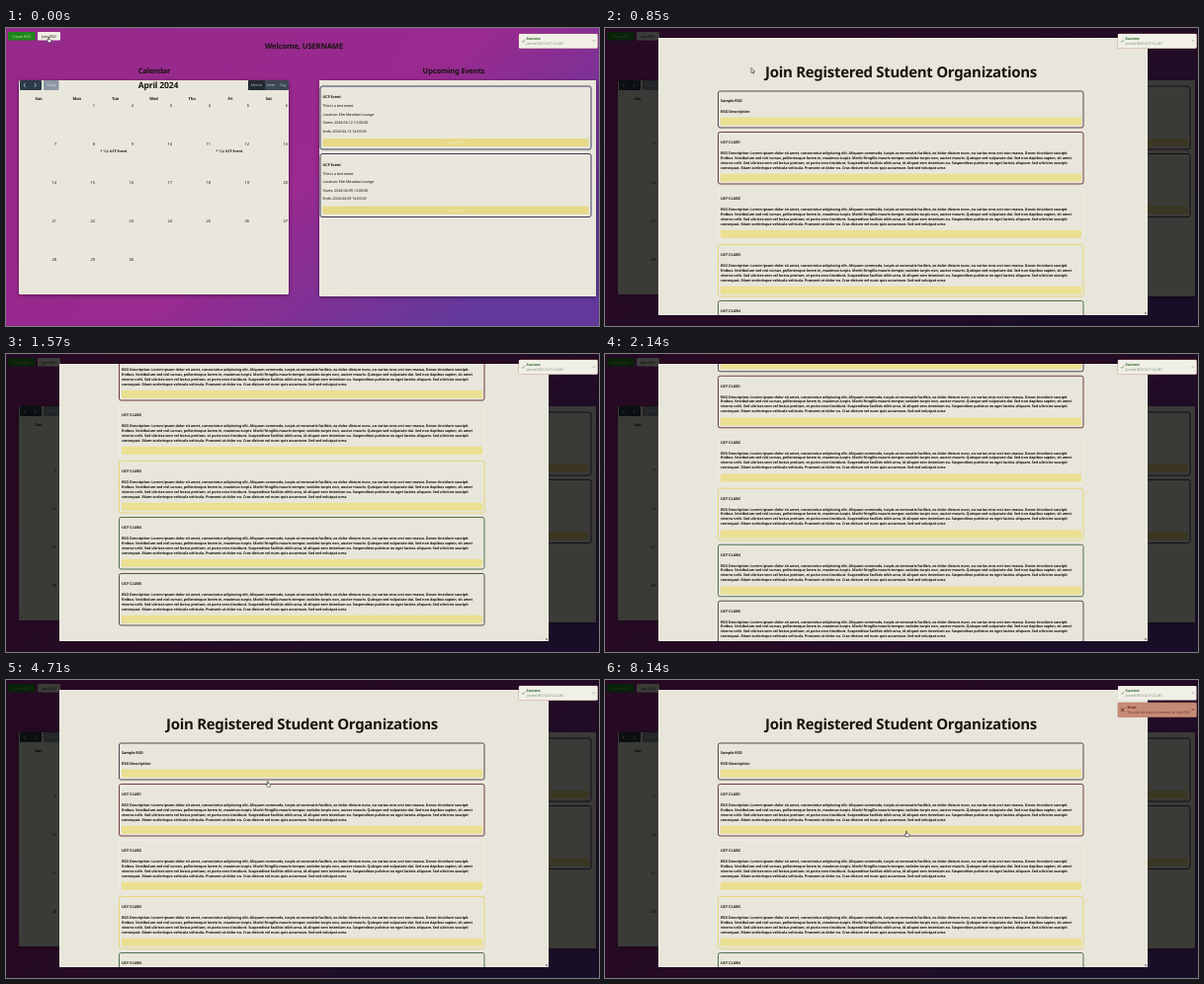
Recreate the animation shown at these times as an HTML page. Size 600x302 px, loop 8.28 s.

```html
<!DOCTYPE html>
<html lang="en">
<head>
<meta charset="utf-8">
<title>Join Registered Student Organizations</title>
<style>
html, body { margin: 0; height: 100%; overflow: hidden; background: #962a8c; }
#stage { display: block; width: 100vw; height: 100vh; }
text {
  font-family: "Noto Sans", "Open Sans", sans-serif;
  letter-spacing: -.02em;
  text-rendering: geometricPrecision;
  white-space: pre;
}
.panel { filter: drop-shadow(0 1px 2px #0006); }
</style>
</head>
<body>
<svg id="stage" viewBox="0 0 600 302">
  <defs>
    <linearGradient id="sky" x1="0" y1="0" x2="1" y2=".6">
      <stop offset="0" stop-color="#96298a"/>
      <stop offset=".6" stop-color="#992a90"/>
      <stop offset="1" stop-color="#62399b"/>
    </linearGradient>
  </defs>
  <g id="page"></g>
  <rect id="shade" width="600" height="302"/>
  <svg id="modal" x="54" y="10" width="495" height="281" viewBox="54 10 495 281">
    <rect x="54" y="10" width="495" height="281" rx="1" fill="#e8e6da" stroke="#f6f5ee"/>
    <g id="list"></g>
    <path d="M545.8 288.6h2.6l-1.3 1.6z" fill="#555"/>
  </svg>
  <g id="error"></g>
  <g id="success"></g>
  <g id="cursor" stroke="#222" stroke-width=".6" fill="#fff">
    <path id="arrow" d="M0 0v5l1.2-1 .9 1.9.8-.4-.9-1.8h1.6z"/>
    <path id="hand" d="M-.5 .4q.6-.8 1 0v2l2 .6q.6.3.4 1.2l-.5 1.6h-2.6l-1.6-2.2q.2-.8 1.3 0z"/>
  </g>
</svg>
<script>
const $ = id => document.getElementById(id);
const cream = '#e9e7db', yellow = '#ebdf92', ink = '#17150f';

const rect = (x, y, w, h, fill, more = '') =>
  `<rect x="${x}" y="${y}" width="${w}" height="${h}" fill="${fill}" ${more}/>`;
const label = (s, x, y, size, { bold, mid, end, fill = ink } = {}) =>
  `<text x="${x}" y="${y}" font-size="${size}" fill="${fill}" font-weight="${bold ? 700 : 400}"
    text-anchor="${mid ? 'middle' : end ? 'end' : 'start'}">${s}</text>`;
const cross = (x, y, r, color) =>
  `<path d="M${x - r} ${y - r}l${2 * r} ${2 * r}m0 ${-2 * r}l${-2 * r} ${2 * r}" stroke="${color}" stroke-width=".9"/>`;
const head = { bold: 1, mid: 1 };

function calendar() {
  let s = rect(13, 53, 273, 217, cream, 'rx="1.5" class="panel"')
    + rect(14, 53, 22, 10, '#2c3a47', 'rx="1"')
    + '<path d="M19.8 56l-1.8 2 1.8 2M28.7 56l1.8 2-1.8 2" fill="none" stroke="#ddd" stroke-width=".7"/>'
    + rect(38, 53, 15.5, 10, '#8a979f', 'rx="1"')
    + label('Today', 45.7, 59.4, 3.6, { mid: 1, fill: '#dde' })
    + rect(245, 53, 41, 10, '#3a4652', 'rx="1"') + rect(245, 53, 17, 10, '#212930', 'rx="1"')
    + label('April 2024', 154, 61, 8.6, head);
  ['Month', 'Week', 'Day'].forEach((v, i) =>
    s += label(v, [253.5, 268, 280.5][i], 59.4, 3.6, { mid: 1, fill: '#b9bec2' }));
  ['Sun', 'Mon', 'Tue', 'Wed', 'Thu', 'Fri', 'Sat'].forEach((d, i) =>
    s += label(d, 33 + 38.8 * i, 73.2, 4, head));
  for (let d = 1; d <= 30; d++)
    s += label(d, 51 + 39 * (d % 7), 80 + 39.1 * (d / 7 | 0), 4, { end: 1 });
  for (const x of [95.5, 212.5])
    s += `<circle cx="${x + .9}" cy="124.2" r=".8" fill="#345"/>`
      + label('12p <tspan font-weight="700">UCF Event</tspan>', x + 2.4, 125.6, 3.6);
  return s;
}

function eventCard(y, date) {
  const lines = ['This is a test event', 'Location: Elm Meadow Lounge',
    `Starts: ${date} 12:00:00`, `Ends: ${date} 14:00:00`];
  return rect(318, y, 274, 64, cream, 'rx="2" stroke="#3f3a5c"')
    + label('UCF Event', 320.5, y + 12, 3.8, { bold: 1 })
    + lines.map((l, i) => label(l, 320.5, y + 21.3 + 8.4 * i, 3.75)).join('')
    + rect(320.5, y + 53, 269, 8, '#e6d988', 'rx="1"')
    + label('Leave Event', 455, y + 58.3, 3.5, { mid: 1, fill: '#f6efc8' });
}

$('page').innerHTML = rect(0, 0, 600, 302, 'url(#sky)')
  + rect(2, 4, 27.5, 8.5, '#1d861b', 'rx="1"')
  + label('Create RSO', 15.7, 9.6, 3.7, { mid: 1, fill: '#b9dfa8' })
  + rect(32, 4, 23, 8.5, '#f0eee6', 'rx="1"') + label('Join RSO', 43.5, 9.6, 3.8, { mid: 1 })
  + label('Welcome, USERNAME', 301.5, 20.6, 7.7, head)
  + label('Calendar', 150, 46, 7.5, head) + label('Upcoming Events', 453, 46, 7.5, head)
  + calendar()
  + rect(317, 53, 280, 219, cream, 'class="panel"')
  + eventCard(59, '2024-04-12') + eventCard(127.5, '2024-04-09');

const lorem = [
  'RSO Description: Lorem ipsum dolor sit amet, consectetur adipiscing elit. Aliquam commodo, turpis at venenatis facilisis, ex dolor dictum nunc, eu varius eros orci non massa. Donec tincidunt suscipit',
  'finibus. Vestibulum sed nisl cursus, pellentesque lorem in, maximus turpis. Morbi fringilla mauris tempor, sodales turpis non, auctor mauris. Quisque sed vulputate dui. Sed non dapibus sapien, sit amet',
  'viverra velit. Sed ultrices sem vel lectus pretium, et porta eros tincidunt. Suspendisse facilisis nibh urna, id aliquet sem interdum eu. Suspendisse pulvinar ex eget lacinia aliquam. Sed ultricies suscipit',
  'consequat. Etiam scelerisque vehicula vehicula. Praesent ut dolor eu. Cras dictum vel nunc quis accumsan. Sed sed volutpat urna'];

const joinBar = y => rect(117, y, 365, 8, yellow, 'rx="1" class="bar"')
  + `<g class="join">${rect(286, y, 31, 8, '#c59a9b', 'rx="1"')}${label('Join', 301.5, y + 5.3, 3.5, { mid: 1, fill: '#f3dcdc' })}</g>`;

function club(i, border) {
  const y = 105.5 + 57 * i;
  return rect(114.5, y, 369.5, 52.5, 'none', `rx="2" stroke="${border}"`)
    + label('UCF CLUB' + (i + 1), 117, y + 11.7, 3.8, { bold: 1 })
    + lorem.map((l, k) => label(l, 117, y + 22.3 + 4.9 * k, 3.7, { bold: 1 })).join('')
    + joinBar(y + 42.3);
}

$('list').innerHTML = label('Join Registered Student Organizations', 299.5, 50, 15, head)
  + cross(540, 16, 1.7, '#7a2a2a')
  + rect(114.5, 64, 369.5, 37, 'none', 'rx="2" stroke="#57454f"')
  + label('Sample RSO', 117, 75.3, 3.8, { bold: 1 })
  + label('RSO Description', 117, 85.5, 3.8, { bold: 1 }) + joinBar(90.5)
  + ['#713d42', '#eeecdf', '#e6d67c', '#53714f', '#56514f'].map((c, i) => club(i, c)).join('');

$('error').innerHTML = rect(519, 6, 79.5, 14.5, '#dfa48f', 'rx="1" stroke="#b97a68" stroke-width=".6" id="errorBox"')
  + cross(523.7, 13.2, 1.7, '#5c1f1a') + cross(594.7, 13, .8, '#7c4438')
  + label('Error', 528.5, 12, 3.8, { bold: 1, fill: '#6b2019' })
  + label('You are already a member of this RSO', 528.5, 17.3, 3.75, { fill: '#7a3a30' });
$('success').innerHTML = rect(519, 6, 79.5, 14.5, '#f1f0e8', 'rx="1"')
  + '<path d="M522 13.2l1.2 1.3 2-2.8" fill="none" stroke="#6a9a58" stroke-width=".8"/>'
  + cross(594.7, 13, .8, '#b5b5a8')
  + label('Success', 526.5, 12, 3.8, { bold: 1, fill: '#2f6b25' })
  + label('Joined RSO UCF CLUB1', 526.5, 17.3, 3.7, { fill: '#7d8f74' });

// Piecewise linear value through [step, value] pairs
function track(n, ...keys) {
  let [a, v] = keys[0];
  for (const [b, w] of keys) {
    if (n < b) return v + (w - v) * Math.max(0, n - a) / (b - a);
    [a, v] = [b, w];
  }
  return v;
}
const move = (id, x, y) => $(id).setAttribute('transform', `translate(${x} ${y})`);
const fade = (el, v) => el.setAttribute('opacity', v);
const bars = document.querySelectorAll('.bar'), joins = document.querySelectorAll('.join');

function draw(n) {
  fade($('shade'), track(n, [0, 0], [1, .3], [3, .6], [6, .75]));
  fade($('modal'), track(n, [0, 0], [1, .5], [2, .9], [3, 1]));
  const fresh = track(n, [3, 1], [5, 0]);
  bars.forEach(b => fade(b, 1 - .6 * fresh));
  joins.forEach(j => fade(j, fresh));
  move('list', 0, -track(n, [8, 0], [9, 13], [10, 68], [11, 111], [14, 111], [18, 0]));

  const pushed = track(n, [49, 0], [51, 1]);
  move('error', track(n, [27, 82], [30, 0]), 17 * pushed);
  $('errorBox').setAttribute('fill', pushed > .5 ? '#c68b77' : '#dfa48f');
  move('success', track(n, [49, 82], [51, 0]), 0);

  move('cursor',
    track(n, [0, 43], [4, 43], [8, 253], [17, 253], [20, 260], [32, 260], [39, 294], [47, 294], [55, 305]),
    track(n, [0, 9], [4, 9], [8, 72], [17, 72], [20, 94], [32, 94], [39, 153]));
  fade($('cursor'), n > 0 && n < 5 || n > 9 && n < 17 ? 0 : 1);
  const pointing = n < 1 || n > 18;
  fade($('hand'), +pointing);
  fade($('arrow'), +!pointing);
}

// The picture advances in held steps, seven per second on a 10 ms clock
function tick() {
  const t = Math.floor(performance.now() % 8280 / 10) * 10;
  draw(Math.floor((t + 9.99) * .007));
  requestAnimationFrame(tick);
}
tick();
</script>
</body>
</html>
```
